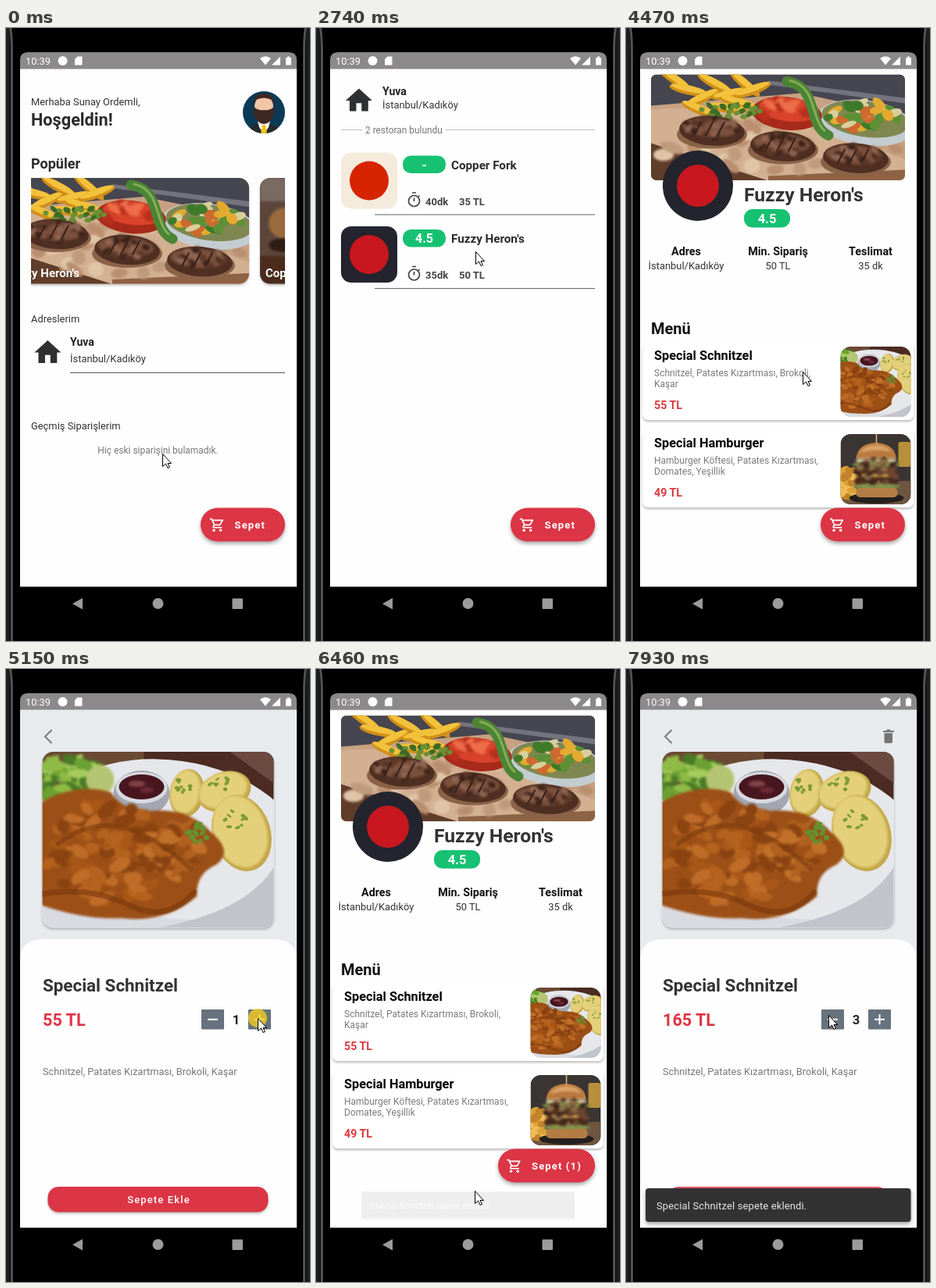
Recreate the animation shown at these times as an HTML page. Size 389x785 px, loop 7.99 s.

```html
<!DOCTYPE html>
<html lang="tr">
<head>
<meta charset="utf-8">
<style>
html, body { margin: 0; height: 100%; overflow: hidden; background: #000; }
svg { display: block; width: 100%; height: 100%; font: 12.9px Roboto, sans-serif; fill: #333; }
.b { font-weight: 700; }
.m { text-anchor: middle; }
.btn { font-weight: 700; font-size: 13px; letter-spacing: 1.14px; fill: #fff; }
.sh { filter: drop-shadow(0 2px 1.5px #0004); }
.lift { filter: drop-shadow(0 3px 2.5px #0005); }
.soft { filter: blur(1.4px); }
</style>
</head>
<body>
<svg id="stage" viewBox="0 0 389 785" preserveAspectRatio="none"></svg>
<script>
const LOOP = 7990;
const RED = '#dc3545', GREEN = '#16c172';
const $ = id => document.getElementById(id);

let seed = 7;
const rnd = (a, b) => {
  seed = (seed * 16807) % 2147483647;
  return a + (b - a) * seed / 2147483647;
};

// --- markup helpers
const text = (x, y, s, size = 12.9, cls = '', fill = '#333') =>
  `<text x="${x}" y="${y}" font-size="${size}" class="${cls}" fill="${fill}">${s}</text>`;
const rect = (x, y, w, h, fill, r = 0, more = '') =>
  `<rect x="${x}" y="${y}" width="${w}" height="${h}" rx="${r}" fill="${fill}" ${more}/>`;
const oval = (x, y, rx, ry, fill, turn = 0) =>
  `<ellipse rx="${rx}" ry="${ry}" fill="${fill}" transform="translate(${x} ${y}) rotate(${turn})"/>`;
const path = (d, fill, more = '') => `<path d="${d}" fill="${fill}" ${more}/>`;
const line = (d, color, width) => path(d, 'none', `stroke="${color}" stroke-width="${width}" stroke-linecap="round"`);
const group = (id, body, more = '') => `<g id="${id}" ${more}>${body}</g>`;
const soft = body => `<g class="soft">${body}</g>`;
const clip = (id, shape) => `<clipPath id="${id}">${shape}</clipPath>`;

function grain(n, cx, cy, rx, ry, colors, size) {
  let out = '';
  for (let i = 0; i < n; i++) {
    const a = rnd(0, 6.28), r = Math.sqrt(rnd(0, 1));
    out += oval(cx + rx * r * Math.cos(a) | 0, cy + ry * r * Math.sin(a) | 0,
      rnd(.5, 1) * size, rnd(.3, .6) * size, colors[i % colors.length], rnd(-50, 50) | 0);
  }
  return out;
}

// --- pictures
const steak = (x, y) => oval(x, y + 5, 45, 18, '#8a6248') + oval(x, y, 42, 19, '#4f2f22', 4) +
  soft(oval(x - 2, y - 4, 36, 12, '#7b503c', 4) + grain(16, x, y - 2, 36, 13, ['#3c2219', '#8d6450', '#5b3829'], 8)) +
  [-18, -3, 12].map(d => line(`M${x + d - 5} ${y + 6}l9-17`, '#38201a', 2)).join('');

const fries = [[8, 6, 34], [26, 20, 12], [44, 30, -25], [60, 12, 28], [80, 25, -12], [98, 12, 40], [90, 36, 14], [76, 43, 8], [40, 45, 22], [108, 20, -20]]
  .map(([x, y, a]) => oval(x + 22, y, 25, 6, '#d08f18', a) + oval(x + 22, y - 2, 23, 4, '#f3c23c', a)).join('');

const grill = rect(0, 0, 325, 136, '#c7a182') +
  path('M0 0H325V52L190 24L0 40Z', '#464650') + path('M150 8L325 30V37L150 13Z', '#74747e') +
  path('M0 45Q120 34 325 108V136H0Z', '#d2b091') + path('M0 88L150 136H0Z', '#5f3d2a') +
  path('M150 130L325 122V136H150Z', '#8e6244') +
  soft(grain(30, 160, 95, 160, 36, ['#b98f70', '#dfc4a8', '#c09a7c'], 16)) + fries +
  oval(274, 62, 62, 29, '#c3ccd0', 8) + oval(274, 57, 56, 23, '#7f8751', 8) +
  grain(34, 273, 53, 46, 17, ['#e3aa2f', '#5d9035', '#d8cf9c', '#cc6a30', '#3f7a2b'], 11) +
  oval(174, 50, 45, 21, '#a82a1a', 6) + oval(176, 45, 39, 15, '#d8432a', 6) +
  soft(grain(12, 172, 46, 34, 12, ['#ee6c48', '#b8301d'], 12)) +
  line('M174 9C216 15 198 64 227 78', '#4c8435', 13) + line('M178 8C212 15 204 56 222 72', '#83ad55', 3) +
  grain(36, 100, 47, 40, 10, ['#3f6b24', '#6b9035'], 6) +
  steak(78, 72) + steak(169, 92) + steak(262, 107);

const potato = (x, y, rx, ry, turn) => oval(x, y, rx, ry, '#c4a84a', turn) +
  soft(oval(x - 2, y - 2, rx - 3, ry - 3, '#e4d07a', turn)) + grain(9, x - 3, y - ry / 3, rx / 2, ry / 3, ['#7d9a35'], 4);

const schnitzel = rect(0, 0, 296, 225, '#d9dbe1') +
  path('M110 0H296V62Q230 22 110 14Z', '#4b2b22') + path('M240 0L296 40V0Z', '#6b4a40') +
  path('M0 0H130V30L60 60H0Z', '#6a4a33') +
  oval(165, 112, 166, 101, '#e6e7eb', 8) + path('M150 225Q260 205 296 148V225Z', '#c2c4cc') +
  soft(grain(70, 36, 38, 44, 32, ['#6ba033', '#8fba45', '#a5cb5c', '#4a7a26'], 14) + oval(74, 36, 18, 19, '#b5c472')) +
  potato(185, 53, 22, 31, 10) + potato(233, 51, 35, 25, -20) + potato(255, 104, 37, 50, -18) +
  oval(127, 53, 36, 29, '#a3a7b0') + oval(127, 46, 33, 20, '#d8dae0') + oval(127, 45, 29, 16, '#47161f') +
  soft(oval(121, 41, 11, 4, '#84414a') + oval(134, 49, 9, 4, '#6d2a34')) +
  soft(path('M-8 68Q42 38 88 52Q105 80 150 75Q190 75 215 102Q246 128 222 145Q196 156 198 185Q158 220 100 213Q50 215 -8 194Z', '#9c4f16') +
    grain(90, 84, 132, 78, 66, ['#b5621f', '#8a4311', '#a85717', '#bf6c28'], 15) +
    grain(34, 168, 122, 42, 38, ['#b0601f', '#8a4311', '#c07029'], 13)) +
  line('M20 118Q60 88 100 96T190 150', '#7b3a0e88', 6) + line('M0 182Q60 172 110 196T194 180', '#74350c88', 7) +
  grain(12, 200, 104, 13, 13, ['#66902f'], 6);

const burger = rect(0, 0, 90, 90, '#3a3532') + rect(0, 60, 90, 30, '#6d5540') +
  grain(24, 10, 65, 14, 24, ['#dca236', '#c2842a', '#eebc58'], 10) + rect(74, 10, 16, 32, '#b88f3a', 3) +
  oval(46, 82, 35, 7, '#25201e') +
  path('M20 31Q22 12 46 11Q70 13 71 31Z', '#b9793e') + soft(path('M25 24Q31 14 46 14Q59 14 65 23Q45 18 25 24Z', '#dba469')) +
  soft(rect(20, 31, 51, 5, '#d5c59a', 2) + oval(46, 39, 31, 4, '#7f8d45') + rect(18, 42, 55, 10, '#51301f', 5) +
    rect(19, 51, 53, 4, '#cf9d45', 2) + rect(18, 55, 56, 10, '#482a1c', 5) + oval(46, 67, 30, 4, '#83944c') +
    grain(26, 46, 50, 27, 18, ['#6b4630', '#8a6a48', '#3d261c'], 7)) +
  rect(20, 69, 53, 12, '#b47c45', 5) + line('M46 0V12', '#d9b887', 1.5);

// --- icons
const house = (x, y) => path('M10 20v-6h4v6h5v-8h3L12 3 2 12h3v8z', '#2f3031', `transform="translate(${x} ${y}) scale(1.7)"`);
const timer = y => `<circle cx="125.500" cy="${y}" r="7" fill="none" stroke="#444" stroke-width="1.700"/>` +
  path(`M123 ${y - 10.5}h5M125.500 ${y - 4}v4.500M131 ${y - 7}l1.500 1.500`, 'none', 'stroke="#444" stroke-width="1.700"');
const cart = path('M15.550 13c.75 0 1.410-.41 1.750-1.030l3.580-6.490A1 1 0 0 0 20 4H5.210l-.94-2H1v2h2l3.600 7.590-1.350 2.440C4.520 15.370 5.480 17 7 17h12v-2H7l1.100-2zM6.160 6h12.150l-2.760 5H8.530z', '#fff', 'fill-rule="evenodd"') +
  oval(7, 20, 2, 2, '#fff') + oval(17, 20, 2, 2, '#fff');

// --- pages
const PLACE = 'İstanbul/Kadıköy', CAFE = "Fuzzy Heron's", DINER = 'Copper Fork';

const home = text(32, 99, 'Merhaba Sunay Ordemli,') + text(32, 125, 'Hoşgeldin!', 21.7, 'b', '#2b2b2b') +
  `<g clip-path="url(#avatar)">${rect(300, 78, 60, 60, '#0c3a55')}${oval(330, 138, 21, 17, '#25282c')}
  ${path('M322 119h16l-2 8-6 9-6-9z', '#fff')}${path('M328 124h4l2 11h-8z', '#f0c419')}
  ${oval(330, 101, 12, 15, '#f2c6a5')}${path('M317 100Q320 106 330 105Q340 106 343 100V110Q340 122 330 123Q320 122 317 110Z', '#3e2723')}${path('M317 99Q316 84 330 84Q344 84 343 99L340 92Q330 87 320 92Z', '#3e2723')}</g>` +
  text(32, 179.5, 'Popüler', 18, 'b', '#2b2b2b') +
  `<g clip-path="url(#strip)">
    ${rect(-14, 192, 325, 135.5, '#fff', 13, 'class="sh"')}
    <g clip-path="url(#card1)"><use href="#grill" x="-14" y="192"/></g>
    <text x="94" y="319" text-anchor="end" font-size="15" class="b" fill="#fff">${CAFE}</text>
    ${rect(325, 192, 80, 135.5, '#5c463b', 13, 'class="sh"')}
    <g clip-path="url(#card2)">${soft(rect(325, 192, 40, 30, '#796a62') + oval(358, 250, 22, 20, '#9a6a3e') + oval(356, 278, 20, 9, '#2f1d15') + rect(325, 292, 40, 36, '#4b2b1c'))}</g>
    ${text(332, 319, DINER, 15, 'b', '#fff')}
  </g>` +
  text(32, 377, 'Adreslerim') + house(33, 395) + text(82, 407, 'Yuva', 14.1, 'b', '#222') + text(82, 428, PLACE) +
  rect(82, 441, 275, 1, '#555') + text(32, 513.5, 'Geçmiş Siparişlerim') +
  text(194.5, 544.5, 'Hiç eski siparişini bulamadık.', 11.95, 'm', '#777');

const shopRow = (y, tile, mark, score, name, time, fee) => rect(32, y, 72, 72, tile, 13) + oval(68, y + 36, 25, 25, mark) +
  rect(111, y + 4, 55, 22.5, GREEN, 10.5) + text(138.5, y + 21, score, 16, 'b m', '#fff') +
  text(173, y + 21, name, 15.2, 'b', '#2b2b2b') + timer(y + 62) +
  text(140, y + 67, time, 13, 'b', '#444') + text(183, y + 67, fee, 13, 'b', '#444') + rect(75, y + 79, 282, 1, '#666');

const shops = house(34.5, 72.5) + text(85, 86, 'Yuva', 14.1, 'b', '#222') + text(85, 103, PLACE) +
  rect(32, 130, 27, 1, '#bbb') + rect(166, 130, 191, 1, '#bbb') +
  `<text id="found" x="63" y="134.500" font-size="11.900" fill="#777"></text>` +
  `<circle id="spin" cx="194.500" cy="188" r="17.500" fill="none" stroke="#6c6c6c" stroke-width="3.600" pathLength="1"/>` +
  group('rows', shopRow(159.5, '#f5ebdc', '#d62300', '-', DINER, '40dk', '35 TL') +
    shopRow(254, '#23242d', '#c8171e', '4.5', CAFE, '35dk', '50 TL'));

const fact = (x, head, body) => text(x, 291, head, 14.3, 'b m', '#111') + text(x, 309, body, 12.9, 'm');
const dish = (y, name, a, b, price, art) => rect(21, y, 347, 99, '#fff', 7, 'class="sh"') +
  text(36, y + 22, name, 16.3, 'b', '#000') + text(36, y + 43, a, 12, '', '#7b7b7b') + text(36, y + 57, b, 12, '', '#7b7b7b') +
  text(36, y + 85, price, 14.2, 'b', '#d93a3f') +
  `<g clip-path="url(#thumb)" transform="translate(274.500 ${y + 5})">${art}</g>`;

const menu = `<g clip-path="url(#banner)"><use href="#grill" x="32" y="59.500"/></g>` +
  oval(92, 202, 45, 45, '#23242d') + oval(92, 202, 27, 27, '#c8171e') +
  text(151, 222, CAFE, 24.7, 'b') + rect(151, 232, 59, 23.5, GREEN, 11) + text(180.5, 250, '4.5', 16.5, 'b m', '#fff') +
  fact(77, 'Adres', PLACE) + fact(194.5, 'Min. Sipariş', '50 TL') + fact(313, 'Teslimat', '35 dk') +
  text(32, 392, 'Menü', 20, 'b', '#111') +
  dish(403, 'Special Schnitzel', 'Schnitzel, Patates Kızartması, Brokoli,', 'Kaşar', '55 TL',
    '<use href="#schnitzel" transform="translate(-14.500 0) scale(.402)"/>') +
  dish(515, 'Special Hamburger', 'Hamburger Köftesi, Patates Kızartması,', 'Domates, Yeşillik', '49 TL', burger);

const stepper = (x, sign) => rect(x, 436, 29, 25.5, '#66727d', 1) + path(`M${x + 8} 448.750h13${sign}`, 'none', 'stroke="#fff" stroke-width="2"');
const detail = rect(18, 52.5, 354, 340, '#e7ebee') + path('M18 715V374Q18 346 48 346H342Q372 346 372 374V715Z', '#fefefe') +
  path('M58.500 78L50 86.500L58.500 95', 'none', 'stroke="#7a7a7a" stroke-width="2"') +
  group('trash', path('M330.500 82h10.500v11q0 2-2 2h-6.500q-2 0-2-2zM329 79h4l1-1.500h4l1 1.500h4v2h-14z', '#757575')) +
  rect(46.5, 106, 296.5, 225.5, '#fff', 14, 'class="sh"') + `<g clip-path="url(#photo)"><use href="#schnitzel" x="46.500" y="106"/></g>` +
  text(47, 413, 'Special Schnitzel', 22.4, 'b') +
  `<text id="price" x="47" y="457" font-size="21.600" class="b" fill="${RED}"></text>` +
  stepper(250, '') + stepper(310, 'm-6.500 -6.500v13') +
  `<text id="count" x="294.500" y="455" font-size="16.500" class="b m" fill="#222"></text>` +
  text(47, 520, 'Schnitzel, Patates Kızartması, Brokoli, Kaşar', 12.75, '', '#777') +
  rect(53.5, 663, 282, 32.5, RED, 14, 'class="sh"') +
  `<g clip-path="url(#order)"><circle id="ripple" cx="196" cy="679" fill="#fff"/></g>` +
  '<text x="195.500" y="684" class="btn m" style="font-weight:500">Sepete Ekle</text>';

const phone = rect(0, 0, 389, 785, '#000') +
  path('M0 0H4Q5 8 5 24V785H0ZM389 0H385Q384 8 384 24V785H389Z', '#1d1e20') +
  line('M5 -4Q7.500 10 7.500 30V790M384 -4Q381.500 10 381.500 30V790', '#505256', 3) +
  rect(18, 52, 354, 663.5, '#fefefe') +
  path('M18 52.500V41Q18 31 28 31H362Q372 31 372 41V52.500Z', '#8b8989') +
  text(25, 46.5, '10:39', 12.9, '', '#fff') + oval(72.5, 42, 6, 6, '#fff') +
  path('M91.500 36.500H97.500V47.500H88V40Z', '#fff') +
  path('M325 39Q332 33.500 339 39L332 47.500ZM351 36.500V47.500H340ZM358 38h2v-1.500h3V38h2v9.500h-7Z', '#fff') +
  path('M98 730V744.500L85 737.250Z', '#9b9b9b') + oval(194.5, 737, 7, 7, '#9b9b9b') + rect(289.5, 730.5, 13.5, 13.5, '#9b9b9b', 1);

$('stage').innerHTML = `<defs>${group('grill', grill)}${group('schnitzel', schnitzel)}
  ${clip('avatar', '<circle cx="330" cy="108" r="27"/>')}${clip('strip', rect(32, 185, 325, 152))}
  ${clip('card1', rect(-14, 192, 325, 135.5, '', 13))}${clip('card2', rect(325, 192, 80, 135.5, '', 13))}
  ${clip('banner', rect(32, 59.5, 325, 135.5, '', 7))}${clip('thumb', rect(0, 0, 90, 90, '', 13))}
  ${clip('photo', rect(46.5, 106, 296.5, 225.5, '', 14))}${clip('order', rect(53.5, 663, 282, 32.5, '', 14))}</defs>` +
  phone + group('home', home) + group('shops', shops) + group('menu', menu) + group('detail', detail) +
  group('fab', `<rect id="pill" y="614.500" height="43" rx="21.500" fill="${RED}" class="lift"/>` +
    group('cart', `<g transform="translate(260 626) scale(.86)">${cart}</g><text id="label" x="292.500" y="641" class="btn"></text>`)) +
  group('snack', rect(25, 665, 339.5, 43, '#323232', 4, 'class="lift"') +
    '<text x="39" y="692" fill="#e8e8e8" letter-spacing=".18">Special Schnitzel sepete eklendi.</text>') +
  group('pointer', '<circle id="tap" r="12" fill="#f7ce1d" opacity=".78"/>' +
    path('M.5 .5V16.500L4.500 13L7 18.500L9.500 17.500L7 12.500H11.500Z', '#fff', 'stroke="#000"'));

// --- timeline
const PAGES = [[0, 'home'], [1410, 'shops'], [3400, 'menu'], [4680, 'detail'], [6390, 'menu'], [7320, 'detail']];
const TAPS = [[1200, 1400], [3150, 3370], [4540, 4680], [5150, 5290], [5420, 5560], [6170, 6370], [7060, 7320]];
const MOVES = [
  [0, 200, 545], [370, 200, 545], [660, 213, 420], [850, 196, 341], [1130, 209, 420],
  [2090, 209, 420], [2420, 226, 345], [2740, 204, 286], [3400, 204, 286], [3940, 230, 437],
  [4010, 226, 440], [4680, 226, 440], [4940, 322, 447], [5560, 322, 447], [5930, 205, 667],
  [6080, 205, 667], [6180, 198, 679], [6390, 198, 679], [6920, 297, 463], [7400, 297, 463],
  [7540, 293, 477], [7760, 247, 431], [7930, 259, 443], [LOOP, 259, 443]
];
const ramp = (t, a, b) => Math.min(1, Math.max(0, (t - a) / (b - a)));
const smooth = p => p * p * (3 - 2 * p);
const show = (id, on) => $(id).style.display = on ? '' : 'none';

function draw(t) {
  const page = PAGES.filter(p => p[0] <= t).pop()[1];
  for (const id of ['home', 'shops', 'menu', 'detail']) show(id, id === page);

  const loaded = t >= 2010;
  $('found').textContent = `${loaded ? 2 : 0} restoran bulundu`;
  show('rows', loaded);
  show('spin', !loaded && t >= 1500);
  const p = ramp(t, 1510, 2177);
  $('spin').setAttribute('stroke-dasharray', `${.03 + .72 * smooth(p)} 1`);
  $('spin').setAttribute('transform', `rotate(${-85 + 150 * p} 194.5 188)`);

  const added = t >= 6390, count = t < 5260 ? 1 : t < 5530 ? 2 : 3;
  $('price').textContent = `${55 * count} TL`;
  $('count').textContent = count;
  show('trash', added);
  const r = ramp(t, 6170, 6350);
  $('ripple').setAttribute('r', 176 * r);
  $('ripple').setAttribute('opacity', r ? .15 : 0);

  show('fab', page !== 'detail');
  $('pill').setAttribute('x', added ? 233 : 249);
  $('pill').setAttribute('width', added ? 124 : 108);
  $('cart').setAttribute('transform', `translate(${added ? -16.5 : 0} 0)`);
  $('label').textContent = added ? 'Sepet (1)' : 'Sepet';

  const s = ramp(t, 6450, 6600), k = .8 + .2 * smooth(s);
  $('snack').setAttribute('opacity', s);
  $('snack').setAttribute('transform', `translate(194.5 686.5) scale(${k}) translate(-194.5 -686.5)`);

  const i = MOVES.findIndex(m => m[0] > t), [t0, x0, y0] = MOVES[i - 1], [t1, x1, y1] = MOVES[i];
  const q = smooth(ramp(t, t0, t1)), at = (a, b) => Math.round(a + (b - a) * q);
  $('pointer').setAttribute('transform', `translate(${at(x0, x1)} ${at(y0, y1)})`);
  show('tap', TAPS.some(([a, b]) => t >= a && t < b));
}

const begin = performance.now();
function tick() {
  draw((performance.now() - begin) % LOOP);
  requestAnimationFrame(tick);
}
tick();
</script>
</body>
</html>
```
